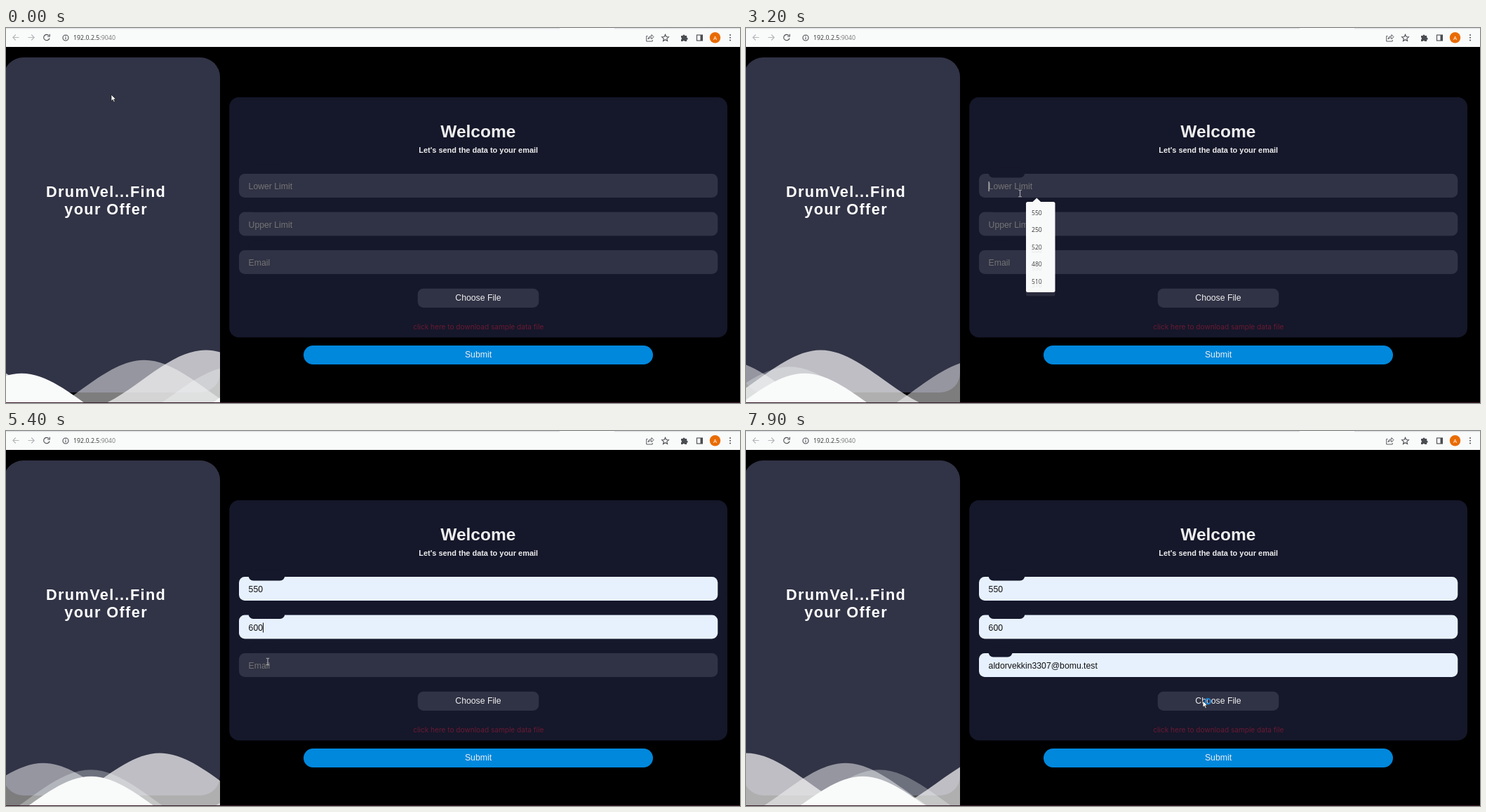
These frames come from a looping animation (1046 px wide and 535 px high, 8 s). An HTML page:

```html
<!DOCTYPE html>
<html lang="en">
<head>
<meta charset="utf-8">
<title>Offer form</title>
<style>
  html, body { margin: 0; width: 100%; height: 100%; overflow: hidden; background: #000; }
  svg { display: block; width: 100%; height: 100%; }
  text { font-family: "Liberation Sans", Arial, sans-serif; font-size: 12.24px; }
  .mid { text-anchor: middle; }
  .bold { font-weight: bold; }
  .h1 { font-size: 21.76px; }
  .ui { font-family: "Open Sans", "Noto Sans", sans-serif; font-size: 8.6px; fill: #333; }
  .icon { fill: none; stroke: #4a4d51; stroke-width: 1.1; }
</style>
</head>
<body>
<svg viewBox="0 0 1046 535">
  <defs>
    <path id="wave" d="M-160 44c30 0 58-18 88-18s58 18 88 18 58-18 88-18 58 18 88 18v44h-352z"/>
    <clipPath id="side"><rect width="305" height="534"/></clipPath>
  </defs>
  <rect width="1046" height="535"/>

  <!-- browser bar -->
  <rect width="1046" height="27" fill="#f9fafa"/>
  <path d="M0 0H789V1.3H0zM867 0h179v1.3H867z" fill="#dcdfe3"/>
  <g class="icon">
    <path d="M18.5 13.5H10M13.8 9.5l-4 4 4 4M31.5 13.5H40M36.2 9.5l4 4-4 4" stroke="#b4b6b9"/>
    <path d="M61 10.7a4.2 4.2 0 1 0 1 3.8M62.3 8.800v3.200h-3.200"/>
    <circle cx="85" cy="14" r="4"/>
    <path d="M85 13.300v3M85 11.300v1"/>
    <path d="M914.5 11.500h-1.800v7.500h8.500v-2M915 16c.3-3 2-4.300 5-4.300V9.500l3 3.200-3 3.100v-2c-2.300 0-3.800.5-5 2.200z" stroke-width=".9"/>
    <path d="M939.5 9.300l1.400 3.200 3.500.3-2.600 2.300.8 3.400-3.100-1.800-3 1.800.8-3.400-2.700-2.300 3.500-.3z"/>
    <rect x="984.5" y="10" width="8" height="8"/>
  </g>
  <path d="M962 11h2.500a1.500 1.500 0 0 1 3 0h2.700v2.700a1.500 1.500 0 0 1 0 3v2.300h-3a1.400 1.400 0 0 0-2.700 0H962v-2.600a1.500 1.500 0 0 0 0-2.800zM989.500 10h3v8h-3z" fill="#4a4d51"/>
  <circle cx="1010.5" cy="13.8" r="7.700" fill="#e96b02"/>
  <text class="mid" x="1010.5" y="16.6" fill="#fff" style="font-size:7.5px">A</text>
  <path d="M1032 10v.01M1032 13.800v.01M1032 17.600v.01" stroke="#4a4d51" stroke-width="2" stroke-linecap="round"/>
  <text class="ui" x="96" y="17" style="font-size:8.85px">192.0.2.5<tspan fill="#777">:9040</tspan></text>

  <!-- side panel -->
  <rect x="-3.4" y="42" width="308.4" height="478" rx="28" fill="#313346"/>
  <g class="mid bold" fill="#fff" letter-spacing="1.36">
    <text class="h1" x="142.6" y="240.8">DrumVel...Find</text>
    <text class="h1" x="142.6" y="265.8">your Offer</text>
  </g>
  <g clip-path="url(#side)">
    <g id="waves" transform="translate(-3.4 336) scale(2.056 4.75)" fill="#f9fafa"></g>
  </g>
  <rect y="534" width="1046" height="1" fill="#3a1d2b"/>

  <!-- form -->
  <rect x="318.3" y="98.7" width="709.7" height="342.8" rx="13.6" fill="#15172a"/>
  <text class="mid bold" x="672.8" y="155.7" fill="#eee" style="font-size:24.48px">Welcome</text>
  <text class="mid bold" x="673.2" y="177.9" fill="#eee" style="font-size:10.95px">Let's send the data to your email</text>
  <g id="fields"></g>
  <rect x="586.7" y="371.7" width="172.6" height="27.3" rx="8.2" fill="#303245"/>
  <text class="mid" x="673" y="389.3" fill="#eee">Choose File</text>
  <text class="mid" x="673.3" y="430" fill="#6a1a33" style="font:10.1px Inter,sans-serif">click here to download sample data file</text>
  <rect x="424" y="453" width="498" height="27" rx="13.5" fill="#08d"/>
  <text class="mid" x="673" y="470.3" fill="#eee">Submit</text>
  <rect id="caret" width="1" height="14"/>
  <g id="popups"></g>

  <g id="pointer">
    <path id="arrow" d="M0 0v9.300l2.200-2 1.500 3.400 1.600-.7-1.500-3.300h2.900z" fill="#fff" stroke="#111" stroke-width=".7"/>
    <path id="beam" d="M-2.200-4.700H-.6L0-4.200.6-4.700H2.200M0-4.200V4.200M-2.200 4.700H-.6L0 4.200.6 4.700H2.200" fill="none" stroke-width=".9"/>
    <circle id="busy" cx="7.2" cy=".8" r="3.7" fill="none" stroke="#1b84d8" stroke-width="2"/>
  </g>
</svg>
<script>
const $ = id => document.getElementById(id);
const clamp = v => Math.max(0, Math.min(1, v));
const show = (el, on) => el.setAttribute('visibility', on ? 'visible' : 'hidden');

function set(el, attrs) {
  for (const k in attrs) el.setAttribute(k, attrs[k]);
}
function add(parent, tag, attrs, text = '') {
  const el = document.createElementNS('http://www.w3.org/2000/svg', tag);
  set(el, attrs);
  el.textContent = text;
  return parent.appendChild(el);
}

const LOOP = 80; // ticks of 100 ms
const LEFT = 345.6;

const fields = [
  { label: 'Lower Limit', options: ['550', '250', '520', '480', '510'], cutWidth: 51.7, popWidth: 41.5 },
  { label: 'Upper Limit', options: ['600', '550', '310'], cutWidth: 51.7, popWidth: 41.5 },
  { label: 'Email', options: ['aldorvekkin3307@bomu.test'], cutWidth: 34, popWidth: 141.5 }
];
const [lower, upper, email] = fields;

// What the user does; pointer, popups, carets and values all follow from this.
const steps = [
  [8, 'focus', lower], [15, 'hover', lower], [22, 'focus', upper],
  [30, 'focus', lower], [36, 'hover', lower], [39, 'pick', lower],
  [42, 'focus', upper], [50, 'hover', upper], [51, 'pick', upper],
  [55, 'focus', email], [60, 'hover', email], [62, 'pick', email],
  [71, 'press']
].map(([at, act, field]) => ({ at, act, field }));
const press = steps[steps.length - 1].at;

fields.forEach((f, i) => {
  const y = f.y = 208 + 54.5 * i;
  f.top = y + 40;
  f.pickedAt = steps.find(s => s.act === 'pick' && s.field === f).at;
  f.box = add($('fields'), 'rect', { x: 332, y, width: 682.3, height: 34, rx: 8.2 });
  f.cut = add($('fields'), 'rect', { x: LEFT, width: f.cutWidth, height: 13.6, rx: 6.8, fill: '#15172a' });
  f.text = add($('fields'), 'text', { x: LEFT, y: y + 22 });
  f.pop = add($('popups'), 'g', { fill: '#f8f9f9' });
  const panel = { x: 399, y: f.top, width: f.popWidth, rx: 2.5 };
  add(f.pop, 'path', { d: `M408 ${f.top + .5}l6.3-6 6.3 6z` });
  add(f.pop, 'rect', { ...panel, height: 24.5 * f.options.length + 6.5 });
  f.row = add(f.pop, 'rect', { ...panel, height: 27.5, fill: '#e8e8e9' });
  f.options.forEach((o, n) => add(f.pop, 'text', { class: 'ui', x: 407, y: f.top + 18.8 + 24.5 * n }, o));
});

// Each deeper wave is slower, lower and fainter, except the solid front one.
const waves = [.7, .5, .3, 1].map((opacity, i) => ({
  period: [7, 10, 13, 20][i],
  lead: i + 2,
  el: add($('waves'), 'use', { href: '#wave', y: [0, 3, 5, 7][i], 'fill-opacity': opacity })
}));

// cubic-bezier(.55, .5, .45, .5)
function ease(x) {
  let lo = 0, hi = 1;
  for (let i = 0; i < 30; i++) {
    const s = (lo + hi) / 2, r = 1 - s;
    if (1.65 * r * r * s + 1.35 * r * s * s + s ** 3 < x) lo = s; else hi = s;
  }
  return 1.5 * lo * (1 - lo) + lo ** 3;
}

function drawWaves(t) {
  const clock = 29.36 + .1036 * t - .2 / (1 + t); // seconds, with a slow start
  for (const w of waves) {
    set(w.el, { x: 175 * ease((clock + w.lead) / w.period % 1) - 42 });
  }
}

const lastStep = (t, acts) => steps.filter(s => s.at <= t && acts.includes(s.act)).pop();
const focusAt = t => lastStep(t, ['focus'])?.field;
const isOpen = (f, t) => focusAt(t - 2) === f && t < f.pickedAt;
const isActive = (f, t) => focusAt(t) === f || t >= f.pickedAt;

function spot({ act, field }) {
  if (act === 'press') return [651, 385];
  return act === 'focus' ? [373, field.y + 12] : [417, field.y + 52];
}

// The pointer arrives one tick before each step, after at most six ticks of travel.
function pointerAt(t) {
  let x = 150, y = 95, last = 0;
  for (const s of steps) {
    const from = Math.max(last, s.at - 7);
    const k = clamp((t - from) / Math.max(1, s.at - 1 - from));
    const [nx, ny] = spot(s);
    x += (nx - x) * k;
    y += (ny - y) * k;
    last = s.at;
  }
  return { x, y };
}

function drawField(f, t, p) {
  const filled = t >= f.pickedAt;
  const preview = isOpen(f, t) && p.x > 399 && p.y > f.top && p.y < f.top + 27.5;
  const lit = f.lit = filled || preview;
  const down = (isActive(f, t - 1) + isActive(f, t - 2)) / 2;
  set(f.box, { fill: lit ? '#e7f1fe' : '#303245' });
  set(f.cut, { y: f.y - 13.6 + 5.44 * down });
  set(f.text, { fill: lit ? '#111' : '#757575' });
  f.text.style.fontSize = preview ? '9.07px' : '12.24px';
  f.text.textContent = lit ? f.options[0] : f.label;
  set(f.pop, { opacity: isOpen(f, t) ? 1 : isOpen(f, t - 1) ? .09 : 0 });
  show(f.row, preview);
}

function drawCaret(t) {
  const step = lastStep(t, ['focus', 'pick']);
  const on = step && (t - step.at) % 10 < 5 && (step.act === 'pick' || !step.field.lit);
  show($('caret'), on);
  if (!on) return;
  const { text, y, lit } = step.field;
  set($('caret'), { x: LEFT + (lit ? text.getComputedTextLength() : 0), y: y + 11, fill: lit ? '#111' : '#ddd' });
}

function drawPointer(t, { x, y }) {
  const onPopup = fields.some(f => isOpen(f, t) && x > 399 && y > f.top);
  const field = fields.find(f => x > 332 && x < 1014 && y > f.y && y < f.y + 34);
  const beam = field && !onPopup;
  set($('pointer'), { transform: `translate(${x} ${y})` });
  show($('arrow'), !beam);
  show($('beam'), beam);
  if (beam) set($('beam'), { stroke: field.lit ? '#222' : '#ccc' });
  show($('busy'), t >= press + 3);
}

function draw(now) {
  const t = Math.floor(now / 100) % LOOP;
  const p = pointerAt(t);
  drawWaves(t);
  fields.forEach(f => drawField(f, t, p));
  drawCaret(t);
  drawPointer(t, p);
}

const start = performance.now();
(function frame() {
  draw(performance.now() - start);
  requestAnimationFrame(frame);
})();
</script>
</body>
</html>
```
